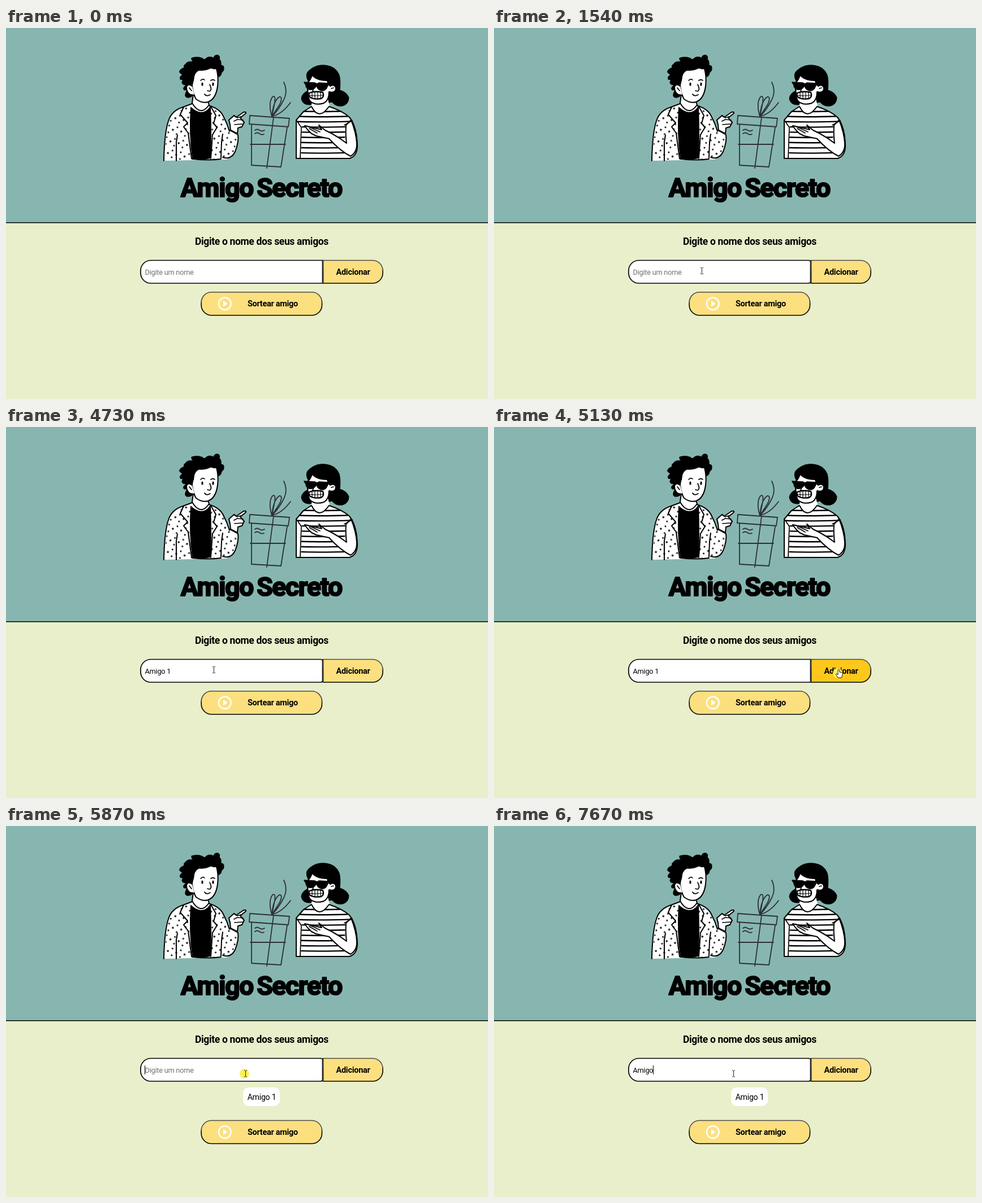
An HTML page that plays this animation: 852x657 px, repeating every 8000 ms.

```html
<!DOCTYPE html>
<html lang="pt-BR">
<head>
<meta charset="utf-8">
<title>Amigo Secreto</title>
<style>
html, body { margin: 0; width: 100%; height: 100%; overflow: hidden; background: #e9efca; }
svg { display: block; }
text { font: 12.8px Roboto, sans-serif; letter-spacing: -.02em; }
.b { font-weight: 700; font-size: 14.5px; }
.mid { text-anchor: middle; }
.ink { fill: none; stroke: #000; stroke-width: 2; stroke-linecap: round; stroke-linejoin: round; }
.w { fill: #fff; }
.k { fill: #000; }
</style>
</head>
<body>
<svg width="852" height="657" viewBox="0 0 852 657">
<defs>
  <linearGradient id="edge" x2="0" y2="1"><stop offset=".35" stop-color="#4c4c4c"/><stop offset=".5"/></linearGradient>
  <pattern id="dots" width="15" height="21" patternUnits="userSpaceOnUse" patternTransform="rotate(12)">
    <circle cx="3" cy="4" r="1.5"/><circle cx="11" cy="10" r="1.7"/><circle cx="4" cy="16" r="1.5"/>
  </pattern>
  <clipPath id="shirt"><path d="M540 139Q553 165 571 139L600 152L611 166L600 175L598 231H521L523 175L513 163L526 148Z"/></clipPath>
</defs>
<rect width="852" height="344" fill="#87b6b0"/>
<rect y="344" width="852" height="1.5"/>

<g id="man" class="ink">
  <path class="w" d="M279 235Q280 183 288 162Q294 146 313 140L329 134L358 137Q378 143 384 156Q392 171 396 183L410 189Q412 201 405 219Q398 234 383 233Z" stroke="none"/>
  <path fill="url(#dots)" stroke="none" d="M281 234Q282 183 289 164Q295 148 313 142L327 139L324 186L327 233ZM361 142Q378 145 384 158Q392 175 396 184L408 190Q410 202 403 218Q396 231 385 230L364 232Z"/>
  <path d="M279 235Q280 183 288 162Q294 146 313 140L329 134M358 137Q378 143 384 156Q391 169 395 183M301 235V202L303 190M314 140L308 153L321 168L314 175L322 186L328 231M362 139L371 155L367 169L373 176L365 189L362 231M380 230L381 203L383 188M396 181L410 189Q412 201 405 219Q398 234 383 229M329 232Q360 235 380 232"/>
  <path class="w" d="M331 118L329 133Q344 158 359 136L356 128Z"/>
  <path class="k" d="M327 141Q335 149 344 150Q355 150 361 140Q363 190 361 230Q346 234 330 230Q324 190 327 141Z"/>
  <path class="w" d="M397 181L396 171L394 163L403 155L407 158L420 149Q425 148 424 151L414 159L421 167L417 175L410 177L409 187Z"/>
  <path d="M403 155L409 159L415 157M403 165L409 162L419 163M404 171L418 170" stroke-width="1.7"/>
  <path class="w" d="M329 84Q327 111 336 126Q347 134 357 131Q371 126 374 103Q376 86 372 72L345 65Z"/>
  <path class="k" d="M330 99L332 86Q335 78 341 75Q353 76 362 71Q370 74 373 71L375 87Q381 85 381 79Q386 76 385 70Q385 66 380 66Q381 58 377 55Q379 50 375 48Q368 47 367 53Q358 48 351 56Q342 49 328 53Q327 57 331 60Q321 58 317 64Q313 66 315 70Q305 74 307 79Q310 82 312 82Q306 87 308 91Q312 92 313 92Q309 97 313 100L318 101Q311 107 315 110L320 110Q314 120 319 123Q325 124 329 121L326 108Z" stroke-width="1"/>
  <path class="w" d="M329 103Q321 97 319 105Q319 114 326 118L333 119"/>
  <path d="M324 106L328 111M344 93Q348 89 351 92M362 93Q366 90 369 93M360 100Q365 109 360 112L356 111M351 117Q354 122 361 118M333 81L331 94" stroke-width="1.7"/>
  <path class="k" d="M347 98v3M366 98v3" stroke-width="3"/>
</g>

<g class="ink" style="stroke:#2c3033;stroke-width:1.8">
  <path d="M431 155L501 160L499 175L430 170ZM434 172L434 243L486 246L497 176M473 158Q466 210 461 248M432 206L494 206M440 181q4-3 8 0t9 0M440 187q4-3 8 0t8 1"/>
  <path d="M470 157Q463 133 471 122Q477 118 475 132ZM470 157Q472 130 483 122Q490 121 484 135ZM471 156Q483 143 490 129Q499 113 491 96M472 156Q488 152 503 132"/>
</g>

<g id="woman" class="ink">
  <path class="k" d="M534 94Q527 81 537 74Q549 64 565 66Q583 68 589 83Q592 94 590 110Q602 113 606 123Q606 135 595 138Q583 140 576 131L568 133L536 136Q524 136 522 125Q523 116 532 112Z" stroke-width="1"/>
  <path class="w" d="M541 131L539 141Q552 169 574 145L569 126Z" stroke="none"/>
  <path class="w" d="M540 139L526 148L513 163L513 231H607Q621 227 621 208Q620 174 607 158Q595 147 571 139Q553 165 540 139Z"/>
  <g clip-path="url(#shirt)"><path id="stripes" stroke-width="2.4"/></g>
  <path class="w" d="M601 172Q600 190 602 204Q589 194 576 187L564 181L553 172L558 180L528 173L533 180L540 187L548 191Q562 194 571 196Q591 218 609 227Q621 220 620 204Q619 186 610 163Z"/>
  <path d="M513 163L522 176L520 231M526 148L519 156M598 172L612 164M536 178L550 186M533 174L555 184" stroke-width="1.7"/>
  <path class="w" d="M534 96Q532 119 537 129Q546 138 562 133Q571 128 571 113Q583 116 583 106Q581 99 573 103Q569 99 568 93Q548 93 541 83Q539 91 534 96Z"/>
  <path d="M575 107L579 106M544 107L542 112L546 113" stroke-width="1.7"/>
  <path class="k" d="M527 96L546 97Q550 100 553 97L571 98L568 104Q565 112 557 111Q550 109 549 102Q544 111 536 109Q530 107 530 101Z" stroke-width="1.5"/>
  <path class="w" d="M536 115Q546 111 560 114Q563 122 557 125Q545 127 538 123Q534 119 536 115Z" stroke-width="2.4"/>
  <path d="M536 119Q547 121 560 119M541 115V123M546 114V125M551 114V125M556 114V124" stroke-width="1.2"/>
</g>

<text class="b mid" x="451.5" y="298.5" stroke="#000" stroke-width="2.2" stroke-linejoin="round" style="font-size:46px;letter-spacing:-1.2px;word-spacing:-4px">Amigo Secreto</text>
<text class="b mid" x="452" y="384" style="font-size:17.5px">Digite o nome dos seus amigos</text>

<path id="field" fill="#fff" stroke="#000" stroke-width="1.7"/>
<path id="add" d="M560.5 411.5H648a18 18 0 0 1 18 18V434a18 18 0 0 1-18 18H560.5Z" stroke="url(#edge)" stroke-width="1.6"/>
<path d="M560.3 411V452.5" stroke="#333" stroke-width="1.8"/>
<text class="b mid" x="613.5" y="437">Adicionar</text>
<text id="typed" x="245.5" y="437" xml:space="preserve"></text>
<rect id="caret" y="424" width="1" height="16"/>

<g id="chip">
  <rect x="419" y="463" width="65" height="33" rx="10" fill="#fff"/>
  <text class="mid" x="452" y="485" style="font-size:14.2px">Amigo 1</text>
</g>
<g id="draw">
  <rect id="drawBox" x="345.2" y="467.8" width="213.3" height="41" rx="18" stroke="url(#edge)" stroke-width="1.6"/>
  <circle cx="386.8" cy="488.3" r="10.8" fill="none" stroke="#fff" stroke-width="2.4"/>
  <path d="M384 483V493.6L391.5 488.3Z" fill="#fff"/>
  <text class="b mid" x="471.5" y="493">Sortear amigo</text>
</g>

<circle id="click" r="8.5" fill="#fcf151"/>
<g id="arrow"><path d="M0 0V13L3 10.2L5 14.8L7 14L5 9.5H9.2Z" fill="#fff" stroke="#000" stroke-width=".9"/></g>
<g id="beam"><path d="M-2.5-5.5H-.8L0-4.8L.8-5.5H2.5M0-4.8V4.8M-2.5 5.5H-.8L0 4.8L.8 5.5H2.5" fill="none" stroke="#222"/></g>
<g id="hand"><path d="M-1.5-6Q0-8 1.3-6V-2L5-1.2Q7-.5 6.5 2L5 8H-1.5L-5 2.5Q-5.5 .5-3.5 1L-1.5 3Z" fill="#fff" stroke="#000" stroke-width=".9"/></g>
</svg>
<script>
const $ = id => document.getElementById(id);
const LOOP = 8000;

$('stripes').setAttribute('d', Array.from({ length: 9 }, (_, i) => 147 + 9.2 * i)
  .map(y => `M505 ${y}Q550 ${y + 2} 610 ${y}`).join(''));

// [start ms, pointer, x, y]
const pointer = [
  [0, ''],
  [190, 'arrow', 389, 558], [260, 'arrow', 384, 534], [330, 'hand', 379, 506], [400, 'hand', 374, 479],
  [470, 'arrow', 369, 453], [540, 'beam', 368, 441], [610, 'beam', 367.5, 434], [680, 'beam', 367.5, 430],
  [4800, 'beam', 430, 432], [4870, 'beam', 535, 434], [4930, 'hand', 609.5, 436],
  [5270, 'hand', 585, 438], [5330, 'beam', 510, 443], [5400, 'beam', 450, 446],
  [5470, 'beam', 429, 445], [5610, 'beam', 425, 441], [5670, 'beam', 423.5, 438.5]
];
// [start ms, text, caret shown]
const typing = [
  [0, '', 0], [1010, '', 1], [1540, '', 0], [2140, '', 1], [2610, '', 0],
  [2670, 'A', 1], [3060, 'Am', 1], [3260, 'Ami', 1], [3460, 'Amig', 1], [3540, 'Amigo', 1],
  [4070, 'Amigo ', 1], [4200, 'Amigo 1', 1], [4730, 'Amigo 1', 0],
  [5200, '', 0], [5870, '', 1], [6410, '', 0],
  [6890, 'A', 1], [7220, 'Am', 1], [7470, 'Ami', 1], [7600, 'Amig', 1], [7670, 'Amigo', 1]
];

const at = (list, t) => list.findLast(k => k[0] <= t);
const within = (t, a, b) => t >= a && t < b;
const show = (id, on) => $(id).style.display = on ? '' : 'none';
const move = (id, x, y) => $(id).setAttribute('transform', `translate(${x} ${y})`);

function render(t) {
  const [, kind, x, y] = at(pointer, t);
  const [, text, caret] = at(typing, t);
  const added = t >= 5200;
  const focus = within(t, 1010, 5130) || t >= 5870;
  const r = focus ? 3 : 0;

  $('field').setAttribute('d', `M256 411.5H${559.5 - r}q${r} 0 ${r} ${r}V${452 - r}q0 ${r} ${-r} ${r}H256a18 18 0 0 1-18-18V429.5a18 18 0 0 1 18-18Z`);
  $('add').setAttribute('fill', within(t, 4930, 5330) ? '#fdc81b' : '#fce07f');
  $('drawBox').setAttribute('fill', within(t, 330, 470) ? '#fdc81b' : '#fce07f');

  $('typed').textContent = text || 'Digite um nome';
  $('typed').setAttribute('fill', text ? '#000' : '#6d746c');
  $('caret').setAttribute('x', Math.round(245 + (text ? $('typed').getComputedTextLength() : 0)));
  show('caret', caret);

  show('chip', added);
  move('draw', 0, added ? 53.7 : 0);

  show('click', within(t, 1010, 1090) || within(t, 5130, 5200) || within(t, 5870, 6010));
  for (const id of ['arrow', 'beam', 'hand']) show(id, id === kind);
  if (kind) {
    move(kind, x, y);
    move('click', x - 2, y);
  }
}

function frame(now) {
  render(now % LOOP);
  requestAnimationFrame(frame);
}
render(0);
requestAnimationFrame(frame);
</script>
</body>
</html>
```
